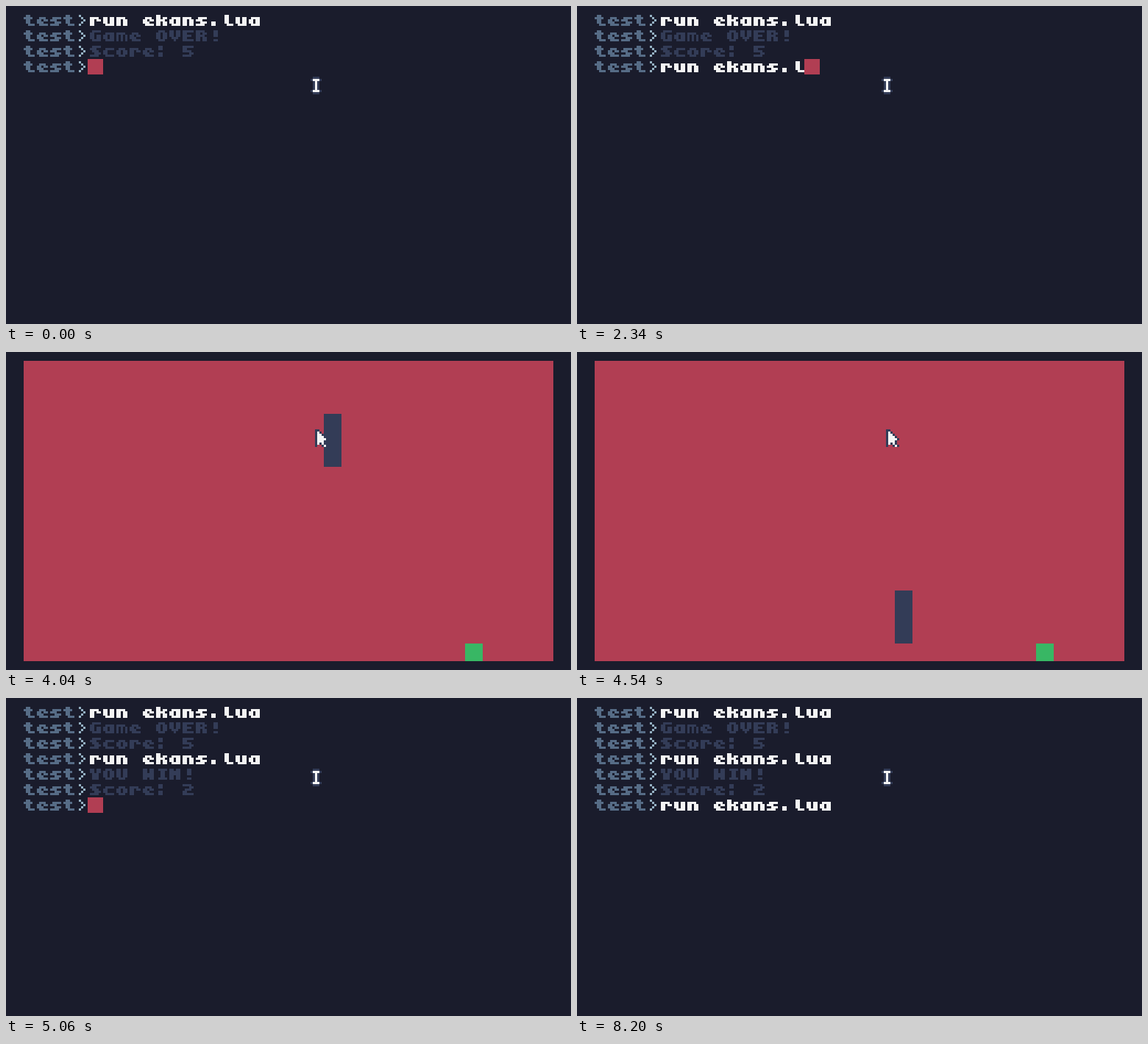
Animation, 768 px wide and 432 px high, one loop 8220 ms. Source, as an HTML page with a canvas:

```html
<!DOCTYPE html>
<html lang="en">
<head>
<meta charset="utf-8">
<title>run ekans.lua</title>
<style>
  html, body { margin: 0; width: 100%; height: 100%; overflow: hidden; background: #1a1c2c; }
  canvas { display: block; }
</style>
</head>
<body>
<canvas id="stage" width="768" height="432" role="img" aria-label="Console: run ekans.lua"></canvas>
<script>
const ctx = document.getElementById('stage').getContext('2d');
const LOOP = 8220;
const BLACK = '#1a1c2c', RED = '#b13e53', GREEN = '#38b764', SLATE = '#333c57',
      STEEL = '#566c86', MIST = '#94b0c2', WHITE = '#f4f4f4';

// Pen strokes as xy digit pairs; the nib is 2 wide, or 1 wide after "-".
const glyphs = {
  a: '31110203143431', c: '311102031434', e: '322111020313 1434', k: '0004 31223334',
  l: '1013 2434', m: '-0401 -0131 -2124 -4244', n: '040121 3234', o: '112132332414030211',
  r: '040121 3232', s: '1131 0212 2333 0424', t: '1013 0121 2434', u: '01031434 3134',
  E: '30000434 0222', G: '30100103143432', I: '1030 2024 1434', N: '0004 3034 -2122',
  O: '102031332414030110', R: '040020312202 3334', S: '3010 0111 1222 2333 2404',
  U: '000314243330', V: '000213 303223 -24', W: '0004 3034 -2223', Y: '000112 303122 1314 2324',
  2: '0020312212030434', 5: '30000222332404',
  '.': '1314', ':': '1011 1314', '!': '2022 24', '>': '-103214'
};

function rect(color, x, y, w, h) {
  ctx.fillStyle = color;
  ctx.fillRect(x, y, w, h);
}

function stroke(code, x, y, color) {
  const nib = code[0] === '-' ? 1 : 2;
  const points = code.replace('-', '').match(/../g).map(p => [+p[0], +p[1]]);
  let [px, py] = points[0];
  for (const [qx, qy] of points) {
    const steps = Math.max(Math.abs(qx - px), Math.abs(qy - py), 1);
    for (let i = 0; i <= steps; i++) {
      const k = i / steps;
      rect(color, x + Math.round(px + (qx - px) * k), y + Math.round(py + (qy - py) * k), nib, 1);
    }
    [px, py] = [qx, qy];
  }
}

function text(str, col, row, color) {
  [...str].forEach((ch, i) => {
    if (glyphs[ch]) glyphs[ch].split(' ').forEach(s => stroke(s, 8 + (col + i) * 6, 4 + row * 7, color));
  });
}

const command = 'run ekans.lua';
const keyTimes = [880, 960, 1060, 1140, 1760, 1840, 1920, 1980, 2060, 2140, 2340, 2440, 2560];
const history = [command, 'Game OVER!', 'Score: 5', command, 'YOU WIN!', 'Score: 2'];

function beam() {
  for (const y of [33, 38]) rect(SLATE, 138, y, 5, 1);
  rect(SLATE, 139, 32, 3, 8);
  for (const y of [33, 38]) rect(WHITE, 139, y, 3, 1);
  rect(WHITE, 140, 33, 1, 6);
}

function terminal(rows, input, caret) {
  const prompt = row => {
    text('test', 0, row, STEEL);
    text('>', 4, row, MIST);
  };
  for (let row = 0; row < rows; row++) {
    prompt(row);
    text(history[row], 5, row, history[row] === command ? WHITE : SLATE);
  }
  prompt(rows);
  text(input, 5, rows, WHITE);
  if (caret) rect(RED, 37 + input.length * 6, 3 + rows * 7, 7, 7);
  beam();
}

function arrow() {
  const x = 140, y = 35;
  [0, 1, 2, 3, 4, 3].forEach((w, r) => {
    rect(SLATE, x, y + r, w + 2, 1);
    rect(WHITE, x + 1, y + r, w, 1);
  });
  rect(SLATE, x, y + 6, 5, 1);
  rect(WHITE, x + 1, y + 6, 1, 1);
  rect(WHITE, x + 3, y + 6, 1, 1);
  rect(SLATE, x, y + 7, 1, 1);
  rect(SLATE, x + 3, y + 7, 3, 1);
  rect(WHITE, x + 4, y + 7, 1, 1);
}

// Corners of the snake's route, one cell per step.
const route = [[15, 8], [13, 8], [13, 1], [17, 1], [17, 16], [26, 16]];
const cells = [route[0]];
for (const [x, y] of route.slice(1)) {
  let [cx, cy] = cells[cells.length - 1];
  while (cx !== x || cy !== y) {
    cx += Math.sign(x - cx);
    cy += Math.sign(y - cy);
    cells.push([cx, cy]);
  }
}

function stepAt(t) {
  if (t < 3280) return 3;
  if (t < 3440) return 4;
  const d = t - 3440;
  return Math.min(37, 5 + Math.floor(d / 100) * 2 + (d % 100 >= 60 ? 1 : 0));
}

function game(t) {
  const cell = ([x, y], color) => rect(color, 8 + x * 8, 4 + y * 8, 8, 8);
  const step = stepAt(t);
  const size = step < 4 ? 4 : step < 37 ? 3 : 2;
  const food = step < 4 ? [13, 7] : step < 37 ? [25, 16] : [11, 3];
  rect(RED, 8, 4, 240, 136);
  cells.slice(step - size + 1, step + 1).forEach(c => cell(c, SLATE));
  cell(food, GREEN);
  if (t >= 2960 && t < 5040) arrow();
}

function draw(t) {
  ctx.setTransform(3, 0, 0, 3, 0, 0);
  rect(BLACK, 0, 0, 256, 144);
  if (t < 2940) {
    const typed = keyTimes.filter(k => k <= t).length;
    terminal(3, command.slice(0, typed), t < 580 || t >= 600);
  } else if (t < 5060) {
    game(t);
  } else {
    const blinkOn = t < 6200 || Math.floor((t - 6200) / 500) % 2 === 1;
    terminal(6, t < 5120 ? '' : command, blinkOn);
  }
}

function loop() {
  draw(performance.now() % LOOP);
  requestAnimationFrame(loop);
}
loop();
</script>
</body>
</html>
```
